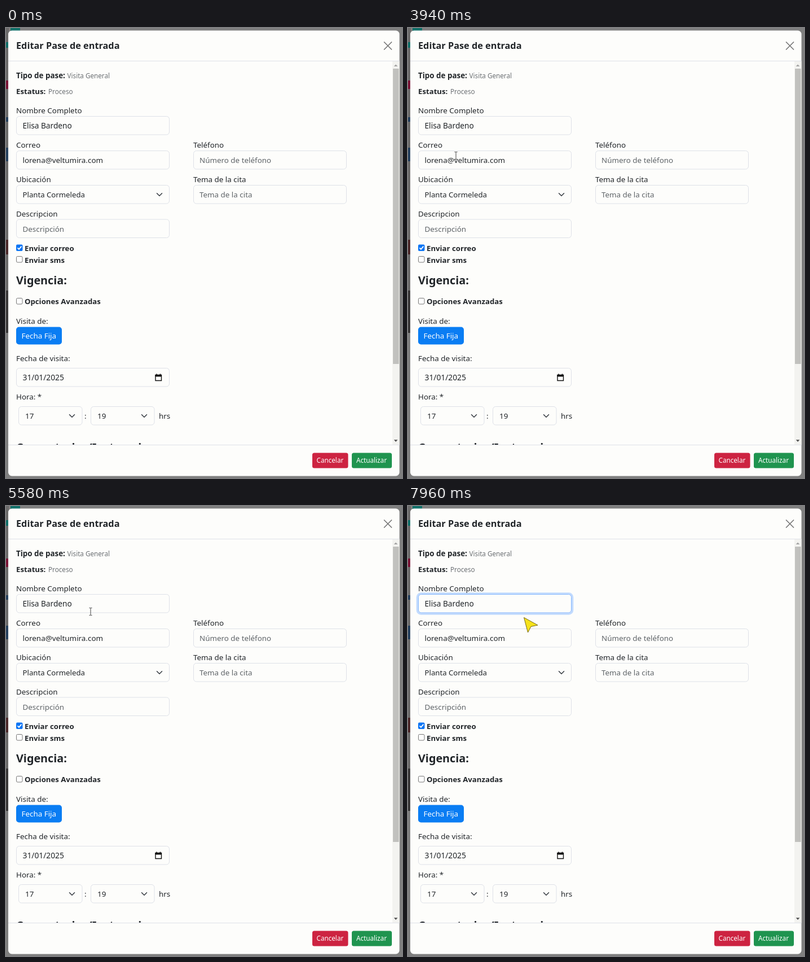
Write an HTML page that moves like this. It is 702 by 797 pixels and loops after 8 s.

```html
<!DOCTYPE html>
<html lang="es">
<head>
<meta charset="utf-8">
<title>Editar Pase de entrada</title>
<style>
html, body { margin: 0; width: 100%; height: 100%; overflow: hidden; background: #7f7f7f; }
svg { display: block; }
text { font: 13.4px "Noto Sans", "Open Sans", sans-serif; fill: #212529; }
.bold { font-weight: 700; font-size: 13.2px; }
.title { font-weight: 600; font-size: 16.3px; }
.head { font-weight: 600; font-size: 19.8px; }
.small { font-size: 11.7px; fill: #6c7074; }
.hint { fill: #5f6468; }
.btn { fill: #fff; }
.btn.sm { font-size: 11.7px; }
.field { fill: #fdfdfb; stroke: #dee1e8; }
.line { stroke: #dfe1e8; }
.chev { fill: none; stroke: #343a40; stroke-width: 1.5; stroke-linecap: round; stroke-linejoin: round; }
.check { fill: #fff; stroke: #767676; }
</style>
</head>
<body>
<svg width="702" height="797" viewBox="0 0 702 797">
  <defs>
    <path id="chev" class="chev" d="M-4.5-2.2 0 2.3 4.5-2.2"/>
    <clipPath id="body"><rect x="4" y="59" width="694" height="679"/></clipPath>
  </defs>

  <!-- dimmed page behind the dialog -->
  <rect width="702" height="797" fill="#7f7f7f"/>
  <rect width="5" height="540" fill="#6c6b6b"/>
  <path d="M8 0h17v5H8zM0 25h5v10H0z" fill="#12706a"/>
  <path d="M0 93h5v15H0z" fill="#7a1638"/>
  <path d="M0 158h5v8H0zM0 212h5v24H0z" fill="#27415f"/>
  <path d="M0 375h5v26H0z" fill="#4d2a2c"/>
  <path d="M0 465h5v75H0z" fill="#3b393a"/>

  <!-- dialog -->
  <rect x="4" y="4.5" width="693.5" height="789" rx="6.5" fill="#fdfdfb"/>
  <path class="line" d="M4 58.5h693.5M4 738.5h693.5"/>
  <text class="title" x="18" y="37">Editar Pase de entrada</text>
  <path d="M670.5 25l13 13m0-13l-13 13" stroke="#777" stroke-width="1.7" stroke-linecap="round"/>

  <rect x="685" y="59" width="12.5" height="679" fill="#f3f3f0"/>
  <rect x="686" y="72" width="10.5" height="523" fill="#c1c1be"/>
  <path d="M687.7 68l3.3-3.6 3.3 3.6z" fill="#a2a2a2"/>
  <path d="M687.7 729.3l3.3 3.6 3.3-3.6z" fill="#505050"/>

  <text class="bold" x="18" y="89" style="font-size:13.4px">Tipo de pase:</text>
  <text class="small" x="108.5" y="88.5">Visita General</text>
  <text class="bold" x="18" y="117">Estatus:</text>
  <text class="small" x="75" y="116.5">Proceso</text>

  <g id="fields"></g>
  <g id="focus">
    <rect id="ring" x="16.5" y="155" width="275" height="36" rx="6.5" fill="none" stroke="#c2dbfe" stroke-width="3.5"/>
    <rect x="18.5" y="156.5" width="271" height="32.5" rx="5" fill="#fdfdfb" stroke="#86b7fe"/>
  </g>
  <rect id="caret" x="118" y="165.5" width="1" height="16" fill="#212529"/>

  <text x="18" y="151">Nombre Completo</text>
  <text x="29.5" y="178" style="font-size:13.7px">Elisa Bardeno</text>
  <text x="18" y="212">Correo</text>
  <text x="29.5" y="239">lorena@veltumira.com</text>
  <text x="332" y="212">Teléfono</text>
  <text class="hint" x="343" y="239">Número de teléfono</text>
  <text x="18" y="273">Ubicación</text>
  <text x="29.5" y="300" style="font-size:13.2px">Planta Cormeleda</text>
  <use href="#chev" x="272" y="295"/>
  <text x="332" y="273">Tema de la cita</text>
  <text class="hint" x="343" y="300">Tema de la cita</text>
  <text x="18" y="334">Descripcion</text>
  <text class="hint" x="29.5" y="361">Descripción</text>

  <rect x="18" y="383.5" width="11.5" height="11.5" rx="2" fill="#0b75f5"/>
  <path d="M20.5 389.3l2.5 2.5 4.4-5.2" fill="none" stroke="#fff" stroke-width="1.8"/>
  <text class="bold" x="33" y="394.5">Enviar correo</text>
  <rect class="check" x="18.5" y="404.5" width="10.5" height="10.5" rx="2"/>
  <text class="bold" x="33" y="415.5">Enviar sms</text>

  <text class="head" x="18" y="454">Vigencia:</text>
  <rect class="check" x="18.5" y="478.5" width="10.5" height="10.5" rx="2"/>
  <text class="bold" x="33" y="489">Opciones Avanzadas</text>

  <text x="18" y="524">Visita de:</text>
  <rect x="18" y="529.5" width="81" height="31" rx="5" fill="#0a7df3"/>
  <text class="btn" x="27.5" y="550">Fecha Fija</text>

  <text x="18" y="590">Fecha de visita:</text>
  <text x="29.5" y="624" style="font-size:13.8px">31/01/2025</text>
  <path d="M265 614.5h10.5v10H265z" fill="none" stroke="#111" stroke-width="1.4"/>
  <path d="M264.5 614h11.5v3.4h-11.5zM266.3 612.4h1.6v2h-1.6zM272.6 612.4h1.6v2h-1.6z" fill="#111"/>

  <text x="18" y="658">Hora: *</text>
  <text x="34" y="692">17</text>
  <use href="#chev" x="117" y="687"/>
  <text x="139" y="692">:</text>
  <text x="162" y="692">19</text>
  <use href="#chev" x="245" y="687"/>
  <text x="271" y="692">hrs</text>
  <g clip-path="url(#body)"><text class="head" x="18" y="749.5">Comentarios/Instrucciones:</text></g>

  <rect x="543" y="752.5" width="63.5" height="27" rx="3.5" fill="#cd2341"/>
  <text class="btn sm" x="550.5" y="770">Cancelar</text>
  <rect x="613" y="752.5" width="71" height="27" rx="3.5" fill="#1f944f"/>
  <text class="btn sm" x="621" y="770">Actualizar</text>

  <g id="pointer">
    <path id="arrow" d="M.5.5L25 14 13 16.5 7.5 27z" fill="#f6e21b" stroke="#75691a" stroke-linejoin="round"/>
    <path id="beam" d="M-2.5-6.5h2l.5.5.5-.5h2M-2.5 6.5h2l.5-.5.5.5h2M0-6V6" fill="none" stroke="#444"/>
  </g>
</svg>
<script>
const $ = id => document.getElementById(id);
const show = (el, on) => el.setAttribute("visibility", on ? "visible" : "hidden");

// x, y, width; all fields share one height
const fieldH = 32.5;
const fields = [
  [18.5, 156.5, 271], [18.5, 217.5, 271], [332.5, 217.5, 271],
  [18.5, 278.5, 271], [332.5, 278.5, 271], [18.5, 339, 271],
  [18.5, 602.5, 271], [22.5, 670.5, 112.5], [150.5, 670.5, 112.5]
];
$("fields").innerHTML = fields.map(([x, y, w]) =>
  `<rect class="field" x="${x}" y="${y}" width="${w}" height="${fieldH}" rx="5"/>`).join("");

// time, x, y of the pointer
const path = [
  [3580, -20, 288], [3940, 91, 222], [4060, 91, 222], [4340, 140, 196],
  [4460, 140, 196], [4740, 147, 189], [4980, 147, 189], [5020, 150, 187],
  [5300, 150, 187], [5860, 151, 187], [6560, 151, 187], [7160, 184, 183],
  [7240, 184, 183], [7560, 211, 196], [7800, 211, 196], [7840, 197, 201],
  [7920, 197, 201], [7960, 205, 197], [8000, 205, 197]
];

function pointerAt(t) {
  const i = path.findIndex(p => p[0] > t);
  const [t0, x0, y0] = path[i - 1], [t1, x1, y1] = path[i];
  const k = (t - t0) / (t1 - t0);
  return [Math.round(x0 + (x1 - x0) * k), Math.round(y0 + (y1 - y0) * k)];
}

function draw(now) {
  const t = Math.floor(now % 8000 / 40) * 40;
  const visible = t >= 3620;
  let inField = false;
  if (visible) {
    const [x, y] = pointerAt(t);
    inField = fields.some(([fx, fy, w]) => x > fx && x < fx + w && y > fy && y < fy + fieldH);
    $("pointer").setAttribute("transform", `translate(${x} ${y})`);
  }
  show($("beam"), visible && inField);
  show($("arrow"), visible && !inField);
  show($("focus"), t >= 6440);
  $("ring").setAttribute("opacity", t < 6560 ? 0.85 : 1);
  show($("caret"), t >= 6440 && t < 6940);
  requestAnimationFrame(draw);
}

requestAnimationFrame(draw);
</script>
</body>
</html>
```
